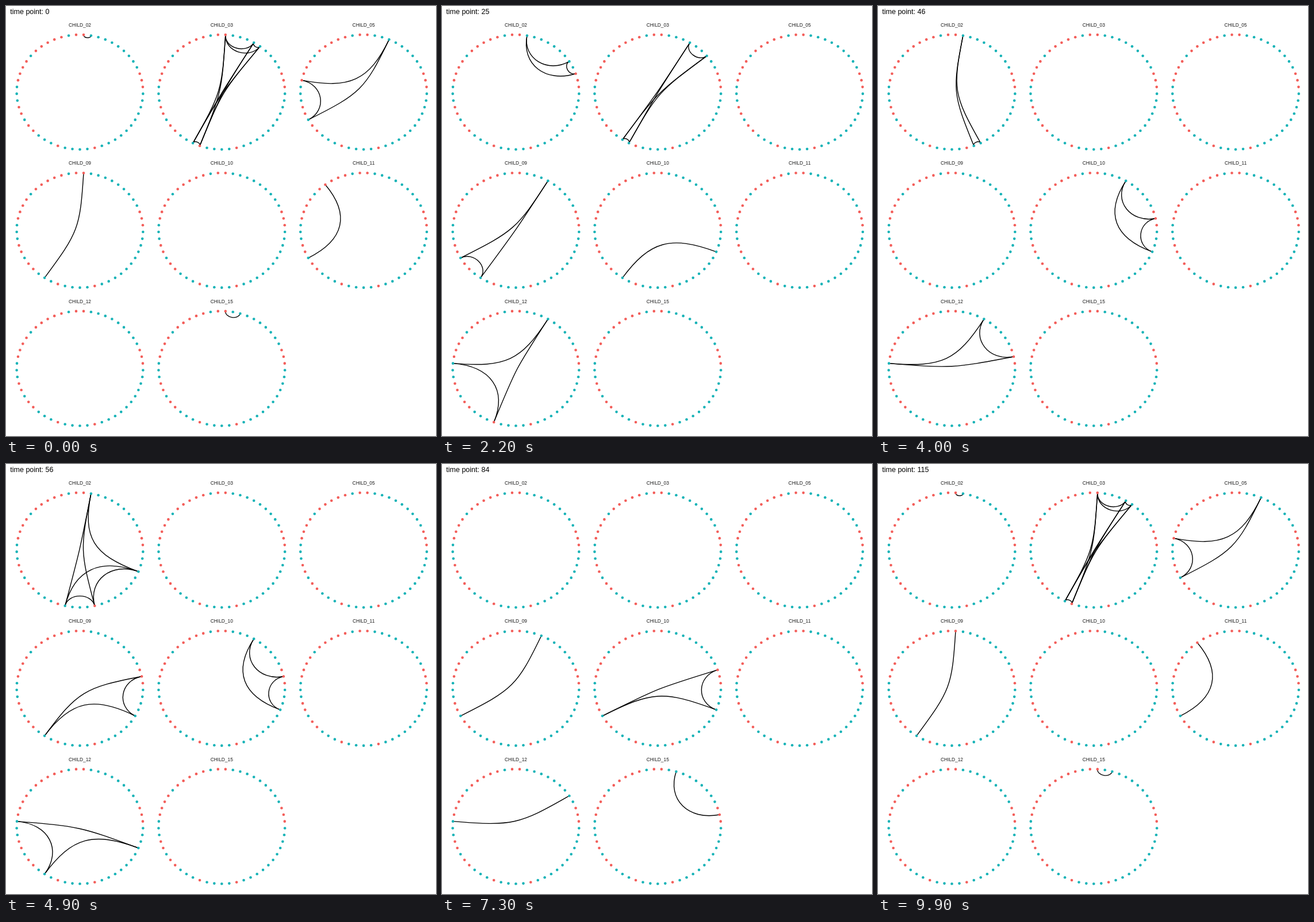
An HTML page with a canvas for the animation above (10000 ms loop, 748 by 748 pixels).

```html
<!DOCTYPE html>
<html lang="en">
<head>
<meta charset="utf-8">
<title>Child networks over time</title>
<style>
  html, body { margin: 0; width: 100%; height: 100%; overflow: hidden; background: #fff; }
  canvas { display: block; width: 748px; height: 748px; }
</style>
</head>
<body>
<canvas id="stage"></canvas>
<script>
const SIZE = 748, STEP = 100, FRAMES = 100, NODES = 53;
const RX = 109.9, RY = 99.8;
const COLORS = ['#F35E5A', '#17B3B7'];
const FONT = '"Liberation Sans", Arial, sans-serif';

// Node colours clockwise from the top, as alternating red and teal runs
const runs = [1, 9, 3, 11, 1, 4, 1, 3, 2, 1, 2, 3, 4, 1, 5, 1, 1];
const nodeColors = runs.flatMap((n, i) => Array(n).fill(COLORS[i % 2]));

// Steps the groups are centred on; each panel lists one linked group per key
const keys = [0, 14, 30, 49, 62, 85];
const panels = {
  CHILD_02: [[0, 1], [1, 8, 10], [1, 22, 23], [1, 16, 24, 28]],
  CHILD_03: [[0, 4, 5, 29, 30], [4, 7, 30, 31], [4, 30, 33]],
  CHILD_05: [[3, 35, 41], [3, 5]],
  CHILD_09: [[0, 31], [4, 31, 35], [], [11, 17, 31], [3, 35]],
  CHILD_10: [[], [], [16, 31], [4, 11, 16], [], [10, 16, 35]],
  CHILD_11: [[35, 47], [9, 35]],
  CHILD_12: [[], [4, 29, 40], [4, 11, 40], [16, 31, 40], [8, 40], [3, 40]],
  CHILD_15: [[0, 2], [], [], [], [], [2, 11]]
};

const canvas = document.getElementById('stage');
const ctx = canvas.getContext('2d');
const dpr = window.devicePixelRatio || 1;
canvas.width = canvas.height = Math.round(SIZE * dpr);
ctx.scale(dpr, dpr);

// Nodes on a unit circle
const nodes = nodeColors.map((color, k) => {
  const a = (k + 0.5) * 2 * Math.PI / NODES;
  return { x: Math.sin(a), y: -Math.cos(a), color };
});

function text(str, x, y, size, align, color) {
  ctx.font = `${size}px ${FONT}`;
  ctx.textAlign = align;
  ctx.fillStyle = color;
  ctx.fillText(str, x, y);
}

// Arc whose handles pull towards the centre by half the chord
function drawEdge(a, b, cx, cy) {
  const pull = 1 - Math.hypot(a.x - b.x, a.y - b.y) / 2;
  const at = (p, s) => [cx + p.x * RX * s, cy + p.y * RY * s];
  ctx.beginPath();
  ctx.moveTo(...at(a, 1));
  ctx.bezierCurveTo(...at(a, pull), ...at(b, pull), ...at(b, 1));
  ctx.stroke();
}

// Nearest key, with the panels slightly out of step; the last step wraps around
function groupAt(groups, i, step) {
  if (step === FRAMES - 1) return groups[0];
  const t = step + (i * 3) % 8 - 3;
  const gaps = keys.map(k => Math.abs(k - t));
  return groups[gaps.indexOf(Math.min(...gaps))] || [];
}

function drawPanel(name, groups, i, step) {
  const cx = 128.5 + (i % 3) * 246.8;
  const cy = 149.7 + Math.floor(i / 3) * 240.4;
  text(name, cx, cy - 113.7, 8.35, 'center', '#1a1a1a');

  const linked = groupAt(groups, i, step);
  ctx.strokeStyle = '#000';
  ctx.lineWidth = 1.4;
  linked.forEach((a, n) => linked.slice(n + 1)
    .forEach(b => drawEdge(nodes[a], nodes[b], cx, cy)));

  for (const p of nodes) {
    ctx.fillStyle = p.color;
    ctx.beginPath();
    ctx.arc(cx + p.x * RX, cy + p.y * RY, 2.3, 0, 2 * Math.PI);
    ctx.fill();
  }
}

function draw(step) {
  ctx.fillStyle = '#fff';
  ctx.fillRect(0, 0, SIZE, SIZE);
  const point = step === FRAMES - 1 ? 115 : Math.floor(step * 29 / 25);
  text('time point: ' + point, 7.3, 14, 12.5, 'left', '#000');
  Object.entries(panels).forEach(([name, groups], i) => drawPanel(name, groups, i, step));
}

const start = performance.now();
let shown = -1;
function tick() {
  const step = Math.floor((performance.now() - start) / STEP) % FRAMES;
  if (step !== shown) draw(shown = step);
  requestAnimationFrame(tick);
}
tick();
</script>
</body>
</html>
```
